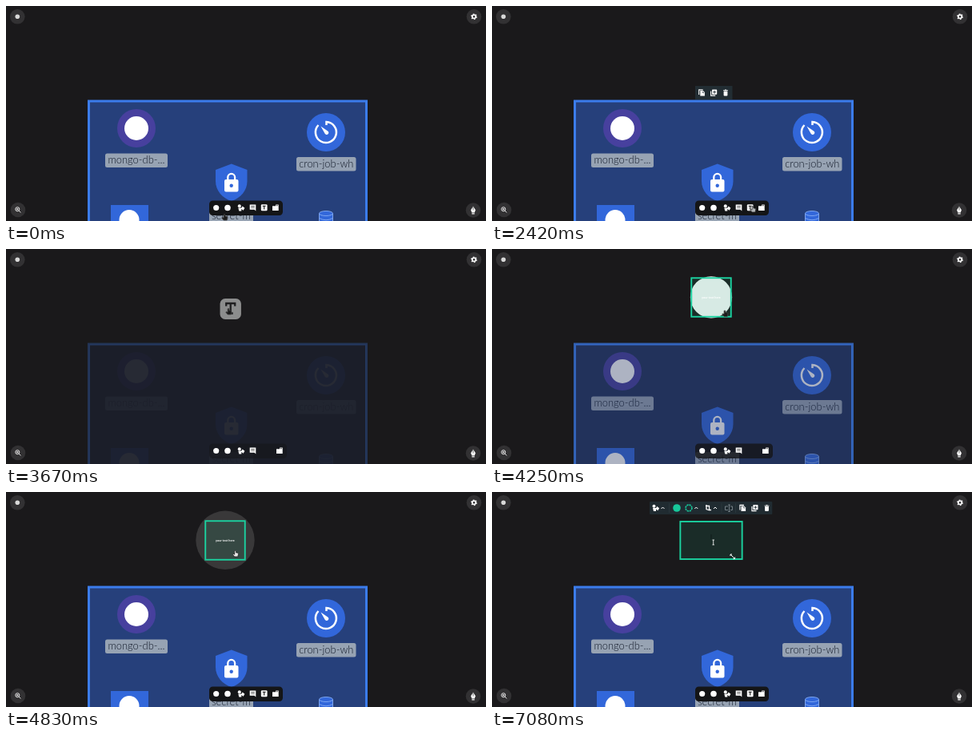
An HTML page for the animation above (8000 ms loop, 600x269 px).

```html
<!DOCTYPE html>
<html lang="en">
<head>
<meta charset="utf-8">
<title>Design canvas</title>
<style>
html, body { margin: 0; width: 100%; height: 100%; overflow: hidden; background: #1a191b; }
svg { display: block; width: 100%; height: 100%; }
text { font-family: Lato, sans-serif; }
.label { font-size: 12.9px; font-weight: 300; fill: #141c2b; text-anchor: middle; }
.line { fill: none; stroke: #fff; }
</style>
</head>
<body>
<svg viewBox="0 0 600 269" preserveAspectRatio="none">
  <defs>
    <g id="shapes" fill="#fff">
      <circle cx="-2" cy="-2.2" r="2"/>
      <path d="M-3.5 0H.5V4H-2.5ZM1.8 -2L4.6 .2L2.8 3.2L0 1Z"/>
    </g>
    <g id="copy">
      <path d="M-3.6 2.4V-3.6H1.4" class="line" stroke-width="1.1"/>
      <path d="M-2 -2.4H1.6L3.6 -.4V4H-2Z" fill="#fff"/>
      <path d="M1.2 -1.6V0H2.8" fill="none" stroke="#222d33" stroke-width=".7"/>
    </g>
    <g id="dup">
      <path d="M-3.6 -2V3.6H2" class="line" stroke-width="1.1"/>
      <rect x="-2.2" y="-3.9" width="6.2" height="6.2" rx=".8" fill="#fff"/>
      <path d="M.9 -2.7V1.1M-1 -.8H2.8" stroke="#222d33" stroke-width=".9"/>
    </g>
    <g id="bin" fill="#fff">
      <path d="M-2.4 -1.9H2.4V3A1 1 0 0 1 1.4 4H-1.4A1 1 0 0 1 -2.4 3ZM-3 -3.3H-1.2L-.7 -4H.7L1.2 -3.3H3V-2.5H-3Z"/>
    </g>
    <path id="up" d="M-2 1L0 -1L2 1" class="line" stroke-width="1"/>
    <path id="hand" d="M0 -3.6C.9 -3.6 .9 -3 .9 -1.2L3.2 -.7C3.9 -.5 4 0 3.8 1L3.2 4H-.9L-3.2 1.2C-3.2 .4 -2.2 .2 -.9 1.2V-2.8Q-.9 -3.6 0 -3.6Z"/>
  </defs>

  <rect id="fill" x="104" y="119" width="346" height="160" fill="#26407b"/>
  <rect id="border" x="103.5" y="119" width="347" height="160" fill="none" stroke="#3b7cec" stroke-width="3"/>
  <g id="nodes">
    <circle cx="163" cy="153" r="24" fill="#47409e"/>
    <circle cx="163" cy="153" r="15" fill="#fff"/>
    <circle cx="400" cy="158" r="24" fill="#3267da"/>
    <path d="M400.500 149V145A13 13 0 1 1 390.500 149" class="line" stroke-width="2.500"/>
    <path d="M393.500 150.500L402.200 156.400A2.500 2.500 0 1 1 398.700 159.800Z" fill="#fff"/>
    <path d="M281.800 197.500L301.500 205V219C301.500 231 293 240.500 281.800 244C270.500 240.500 262 231 262 219V205Z" fill="#3267da"/>
    <path d="M277.300 218V214.300A4.400 4.400 0 0 1 286.100 214.300V218" class="line" stroke-width="2.300"/>
    <rect x="273" y="217" width="17.500" height="15.500" rx="2" fill="#fff"/>
    <circle cx="281.700" cy="224.700" r="2.200" fill="#3267da"/>
    <rect x="131" y="249" width="47" height="24" fill="#3267da"/>
    <circle cx="154" cy="267.500" r="12.500" fill="#fff"/>
    <g fill="#3267da" stroke="#86adf4" stroke-width=".9">
      <path d="M391.500 259.500V272H408.500V259.500"/>
      <ellipse cx="400" cy="259.500" rx="8.500" ry="3"/>
      <path d="M391.500 265.500Q400 270 408.500 265.500" fill="none"/>
    </g>
    <g id="labels"></g>
  </g>

  <circle id="ripple" cx="274" cy="60.300" fill="#fff"/>
  <g id="box">
    <rect id="area" fill="#1fd6a0" fill-opacity=".1" stroke="#1bd2a0" stroke-width="1.900"/>
    <text id="hint" x="274" y="62" font-size="3.800" font-weight="700" fill="#fff" text-anchor="middle">your text here</text>
  </g>
  <g id="edit">
    <path d="M274 53V59" stroke="#0e1715" stroke-width=".8"/>
    <path d="M275.400 60H278M276.700 60V66M275.400 66H278" class="line" stroke-width=".8"/>
    <path d="M298.300 78.300L303.300 83.300M298 80V78H300M303.600 81.500V83.600H301.500" class="line" stroke-width="1"/>
  </g>

  <g id="dock">
    <rect id="dockBg" x="254" y="243.500" height="18.500" rx="4.500" fill="#141517"/>
    <circle cx="262.700" cy="252.500" r="3.600" fill="#fff"/>
    <circle cx="277" cy="252.500" r="3.800" fill="#fff"/>
    <use href="#shapes" x="293.800" y="252.500"/>
    <path d="M304.700 248.500H312.300V256.500L310.500 254.800H304.700Z" fill="#fff"/>
    <path d="M306.200 250.500H310.800M306.200 252.300H310.800" stroke="#222" stroke-width=".7"/>
    <g id="typeIcon">
      <rect x="318.800" y="248.200" width="7.800" height="8" rx="1.300" fill="#fff"/>
      <path d="M320.700 250.300H324.700M322.700 250.300V254.500" stroke="#151515" stroke-width="1.100"/>
    </g>
    <g id="folder">
      <path d="M333 250.300H337.200V248.500H340.700V256H333Z" fill="#fff"/>
      <path d="M338.100 249.700H339.600" stroke="#222" stroke-width=".9"/>
    </g>
  </g>

  <g id="groupBar">
    <rect x="254" y="100" width="46.500" height="17" fill="#222d33"/>
    <use href="#copy" x="262.300" y="108.500"/>
    <use href="#dup" x="277.200" y="108.500"/>
    <use href="#bin" x="292" y="108.500"/>
  </g>

  <g id="textBar">
    <rect x="197" y="12" width="153.300" height="16" rx="1" fill="#202b31"/>
    <path d="M221.500 14V26M287 14V26M304.500 14V26" stroke="#2f3b41" stroke-width=".7"/>
    <use href="#shapes" x="204.500" y="20"/>
    <use href="#up" x="213.500" y="20"/>
    <circle cx="231" cy="20" r="4.800" fill="#17c79a"/>
    <circle cx="246" cy="20" r="3.900" fill="none" stroke="#17c79a" stroke-width="1.700" stroke-dasharray="2.200 .86"/>
    <use href="#up" x="255.300" y="20"/>
    <path d="M267 17.500H271.500V22.500H274M268 16V21.500L272 23" class="line" stroke-width="1.300"/>
    <use href="#up" x="279" y="20"/>
    <path d="M295 18H291.500V22.500H295M298 18H300.500V22.500H298M295.200 16H297.800M296.500 16V24.500M295.200 24.500H297.800" fill="none" stroke="#7b868c" stroke-width=".9"/>
    <use href="#copy" x="313.500" y="20"/>
    <use href="#dup" x="328.500" y="20"/>
    <use href="#bin" x="343.500" y="20"/>
  </g>

  <g fill="#323133">
    <circle cx="14.300" cy="13.300" r="9.300"/>
    <circle cx="585" cy="13.300" r="9.300"/>
    <circle cx="15" cy="255" r="9.300"/>
    <circle cx="584" cy="255.500" r="9.300"/>
  </g>
  <circle cx="14.300" cy="13.300" r="2.800" fill="#d8d8d8"/>
  <circle cx="585" cy="13.300" r="2.200" class="line" stroke-width="1.700"/>
  <circle cx="585" cy="13.300" r="3.300" class="line" stroke-width="1.100" stroke-dasharray="1.730 1.725"/>
  <circle cx="14.300" cy="254.200" r="2.500" class="line" stroke-width=".9"/>
  <path d="M16.200 256.200L18.400 258.400M13.100 254.200H15.500M14.300 253V255.400" class="line" stroke-width=".9"/>
  <path d="M584 250.500L586.900 255.300L585.700 258.500H582.300L581.100 255.300ZM582.300 259.300H585.700V260.500H582.300Z" fill="#fff"/>
  <path d="M584 251V255.500" stroke="#323133" stroke-width=".7"/>

  <g id="ghost">
    <rect x="-13.200" y="-13" width="26.400" height="26" rx="6.500" fill="#8c8d8d"/>
    <path d="M-5.500 -3.500V-7H5.500V-3.500M0 -7V5M-3 5.500H3" fill="none" stroke="#1f1f20" stroke-width="2.300"/>
  </g>
  <use id="cursor" href="#hand" stroke-width=".8"/>
</svg>
<script>
const LOOP = 8000;
const GRAB = 3080, DROP = 4190, RELEASE = 4670, EDIT = 6250;
const RIPPLE = 740;
const $ = id => document.getElementById(id);
const clamp = v => Math.max(0, Math.min(1, v));
const ramp = (t, a, b) => clamp((t - a) / (b - a));
const mix = (a, b, k) => a + (b - a) * k;
const during = (t, a, b) => t >= a && t < b;
const set = (id, attrs) => { for (const k in attrs) $(id).setAttribute(k, attrs[k]); };
const show = (id, on) => { $(id).style.display = on ? '' : 'none'; };

const labels = [
  ['mongo-db-...', 124, 184.5, 78],
  ['cron-job-wh', 363, 189, 74.5],
  ['secret-m', 254, 254, 55]
];
$('labels').innerHTML = labels.map(([name, x, y, w]) =>
  `<rect x="${x}" y="${y}" width="${w}" height="17.5" rx="2.5" fill="#97a3b3"/>
   <text class="label" x="${x + w / 2}" y="${y + 12.8}">${name}</text>`).join('');

// Pointer stops: time, x, y
const stops = [
  [0, 273, 264], [80, 273, 264], [1170, 312.5, 255], [2340, 326, 254],
  [GRAB, 325, 254], [3440, 302, 124], [3670, 278, 78], [DROP, 291, 80.5],
  [RELEASE, 291, 80.5], [5330, 273, 66], [LOOP, 273, 66]
];

function pointer(t) {
  const i = stops.findIndex(s => s[0] > t);
  const [a, ax, ay] = stops[i - 1], [b, bx, by] = stops[i];
  const k = ramp(t, a, b);
  return [mix(ax, bx, k), mix(ay, by, k)];
}

function draw(t) {
  const dim = ramp(t, GRAB, GRAB + 120) * (1 - ramp(t, DROP, DROP + 100));
  $('fill').style.opacity = mix(1, .15, dim);
  $('border').style.opacity = mix(1, .28, dim);
  $('nodes').style.opacity = mix(1, .05, dim);

  // The dock widens while its text tool is being carried
  const carried = during(t, GRAB, RELEASE);
  set('dockBg', { width: carried ? 97 : 92, opacity: mix(1, .5, dim) });
  set('folder', { transform: `translate(${carried ? 5 : 0} 0)` });
  show('typeIcon', !carried);
  show('groupBar', during(t, 250, GRAB));

  const [x, y] = pointer(t);
  show('ghost', during(t, GRAB, DROP));
  set('ghost', { transform: `translate(${x + 2.7} ${y - 3})` });

  const spread = ramp(t, DROP, DROP + RIPPLE);
  show('ripple', during(t, DROP, DROP + RIPPLE));
  set('ripple', { r: mix(25, 38.5, spread), opacity: 1 - spread });

  const grow = ramp(t, DROP + RIPPLE - 60, DROP + RIPPLE + 60);
  const w = mix(49.5, 77.3, grow), h = mix(48.5, 47, grow);
  show('box', t >= DROP);
  set('area', { x: 274 - w / 2, y: 60.5 - h / 2, width: w, height: h });

  const editing = t >= EDIT;
  show('hint', !editing);
  show('edit', editing);
  show('textBar', t >= 6080);

  const dark = t < 300 || carried;
  show('cursor', !editing);
  set('cursor', {
    transform: `translate(${x} ${y})`,
    fill: dark ? '#1b1b1b' : t < GRAB ? '#b5b8ba' : '#e8e8e8',
    stroke: dark ? '#444' : '#222'
  });
}

function tick(now) {
  draw(now % LOOP);
  requestAnimationFrame(tick);
}
draw(0);
requestAnimationFrame(tick);
</script>
</body>
</html>
```
